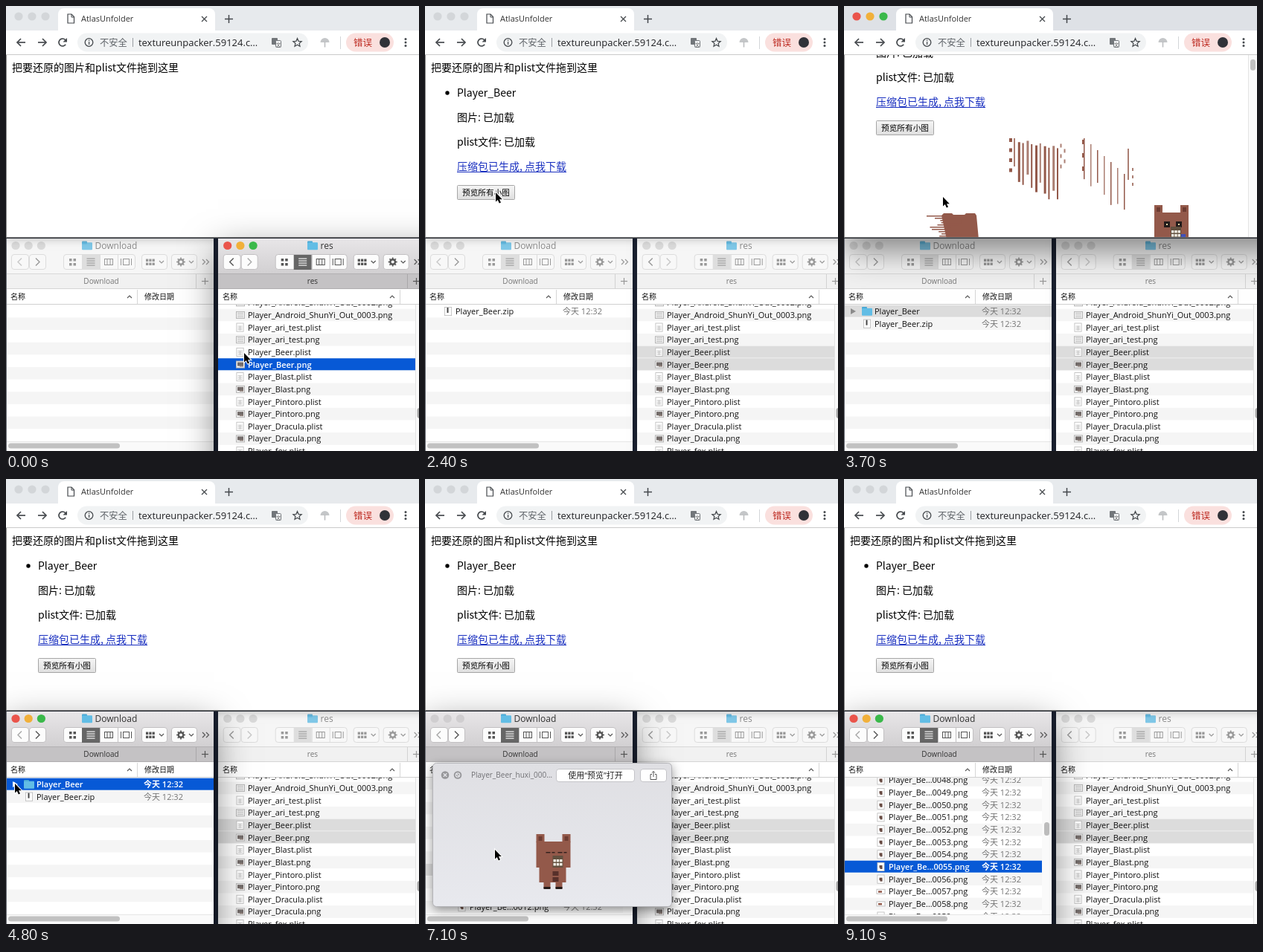
Write an HTML page with a canvas that moves like this. It is 555 px wide and 599 px high and loops after 9200 ms.

```html
<!DOCTYPE html>
<html lang="zh">
<head>
<meta charset="utf-8">
<style>
html, body { margin: 0; height: 100%; overflow: hidden; background: #1b2233; }
canvas { display: block; }
</style>
</head>
<body>
<canvas id="stage" width="555" height="599"></canvas>
<script>
const c = document.getElementById('stage').getContext('2d');
const LOOP = 9200, PITCH = 16.65;
const UI = '"Open Sans","Noto Sans CJK SC","Noto Sans CJK",sans-serif';
const WEB = '"Noto Sans CJK SC","Noto Sans CJK",sans-serif';
const BROWN = '#93594a', BLUE = '#0759d6';

// time, values...
const CURSOR = [[0, 320, 467], [200, 318, 466], [700, 186, 230], [900, 186, 230], [1200, 100, 215],
  [1500, 100, 215], [1800, 70, 410], [2100, 70, 410], [2400, 95, 251], [2700, 97, 252], [3000, 133, 257],
  [4000, 133, 257], [4300, 88, 251], [4500, 88, 251], [4800, 12, 410], [5000, 12, 410], [5300, 70, 438],
  [6700, 70, 438], [7600, 124, 575], [9200, 124, 575]];
const PAGE = [[2800, 0], [3700, 87], [4000, 140], [4300, 0]];
const SELECT = [[5000, 0], [5300, 4], [6200, 4], [6700, 7], [8000, 30], [9100, 60]];
const LIST = [[6700, 0], [8000, 383], [9100, 888]];

function at(keys, t) {
  let i = keys.findIndex(k => k[0] > t);
  if (i < 0) return keys[keys.length - 1].slice(1);
  if (i === 0) return keys[0].slice(1);
  const a = keys[i - 1], b = keys[i], p = (t - a[0]) / (b[0] - a[0]);
  return a.slice(1).map((v, j) => v + (b[j + 1] - v) * p);
}
const within = (t, a, b) => t >= a && t < b;

function rect(x, y, w, h, fill) { c.fillStyle = fill; c.fillRect(x, y, w, h); }
function round(x, y, w, h, r, fill, stroke) {
  c.beginPath(); c.roundRect(x, y, w, h, r);
  if (fill) { c.fillStyle = fill; c.fill(); }
  if (stroke) { c.strokeStyle = stroke; c.lineWidth = 1; c.stroke(); }
}
function disc(x, y, r, fill) { c.beginPath(); c.arc(x, y, r, 0, 7); c.fillStyle = fill; c.fill(); }
function ring(x, y, r, color, a = 0, b = 7, w = 1.3) {
  c.beginPath(); c.arc(x, y, r, a, b); c.strokeStyle = color; c.lineWidth = w; c.stroke();
}
function path(...p) { c.beginPath(); for (let i = 0; i < p.length; i += 2) c.lineTo(p[i], p[i + 1]); }
function line(color, w, ...p) { path(...p); c.strokeStyle = color; c.lineWidth = w; c.stroke(); }
function shape(fill, ...p) { path(...p); c.fillStyle = fill; c.fill(); }
function text(s, x, y, size, color = '#111', font = UI, align = 'left', weight = '') {
  c.font = `${weight} ${size}px ${font}`; c.textAlign = align; c.fillStyle = color; c.fillText(s, x, y);
}
function fade(y0, y1, a, b) {
  const g = c.createLinearGradient(0, y0, 0, y1);
  g.addColorStop(0, a); g.addColorStop(1, b);
  return g;
}
function clip(x, y, w, h, draw) {
  c.save(); c.beginPath(); c.rect(x, y, w, h); c.clip(); draw(); c.restore();
}
function shadowed(alpha, blur, dy, draw) {
  c.save();
  c.shadowColor = `rgba(0,0,0,${alpha})`; c.shadowBlur = blur; c.shadowOffsetY = dy;
  draw();
  c.restore();
}
function pane(x, y, w, h, on) {
  const fill = () => rect(x, y, w, h, '#fff');
  if (on) shadowed(.5, 46, 16, fill); else shadowed(.2, 10, 3, fill);
}
function lights(x, y, gap, on, off) {
  ['#ea544b', '#f1b03a', '#3ab94a'].forEach((col, i) => disc(x + gap * i, y, 5.6, on ? col : off));
}

function bear(x, y, shut) {
  const r = (a, b, w, h, f) => rect(x + a, y + b, w, h, f);
  for (const a of [0, 35]) { r(a, 0, 11, 11, BROWN); r(a + 3, 3, 5, 6, '#6d3c32'); }
  r(0, 10, 46, 35, BROWN);
  r(4, 45, 36, 20, BROWN);
  for (const a of [13, 29]) {
    if (shut) { r(a, 24, 6, 1.5, '#35221e'); r(a + 8, 24, 4, 1.5, '#35221e'); }
    else { r(a, 22, 8, 8, '#221b1a'); r(a + 3, 25, 2, 2, '#e8d9a8'); }
  }
  r(22, 29, 14, 16, '#62503f');
  for (let i = 0; i < 6; i++) r(23 + i % 3 * 4.3, 34 + (i > 2) * 5, 3.4, 3.5, '#f3efe6');
  if (!shut) r(36, 39, 6, 6, '#3f51b8');
  r(22, 50, 8, 6, '#57302a'); r(22, 58, 8, 6, '#57302a');
  for (const a of [10, 26]) { r(a, 65, 9, 8, BROWN); r(a, 71, 9, 3, '#241917'); }
}

function previews(y) {
  const pale = '#ab7f73';
  for (let i = 0; i < 11; i++) {
    const x = 228 + i * 5.8, n = Math.abs(Math.sin(i * 7.3));
    rect(x, y + i + n * 5, 2 + i % 2, 38 + i * 2 + n * 16, i % 3 ? BROWN : pale);
    if (i % 3 === 0) rect(222, y + i * 4.5, 4, 5, BROWN);
    if (i % 2) rect(288 + i % 4 * 2.5, y + 4 + i * 3.5, 2, 5, pale);
  }
  for (let i = 0; i < 7; i++) {
    const n = Math.abs(Math.sin(i * 4.1 + 1));
    rect(322 + i * 9, y + i * 8, 1.5, 40 + n * 18, i % 2 ? pale : BROWN);
  }
  rect(381, y + 14, 2, 42, pale);
  for (let i = 0; i < 3; i++) { rect(320, y + 2 + i * 18, 3, 6, BROWN); rect(387, y + 40 + i * 10, 2, 4, pale); }
  shape(BROWN, 131, y + 104, 134, y + 101, 145, y + 101, 147, y + 103, 162, y + 103, 164, y + 101,
    176, y + 101, 178, y + 104, 181, y + 136, 138, y + 136);
  for (let i = 0; i < 12; i++) {
    const n = Math.abs(Math.sin(i * 5.7));
    rect(111 + n * 20, y + 104 + i * 3, 28, 1.5, BROWN);
  }
  bear(417, y + 90);
  for (let i = 0; i < 8; i++) bear(122 + i % 4 * 98.3, y + 190 + (i >> 2) * 100, i % 3 === 1);
}

function webPage(t) {
  const scroll = within(t, 2800, 4400) ? at(PAGE, t)[0] : 0;
  const shown = within(t, 2600, 4400);
  const say = (s, x, y, col = '#000') => text(s, x, y - scroll, 14, col, WEB);
  clip(0, 66, 555, 246, () => {
    say('把要还原的图片和plist文件拖到这里', 8, 88);
    if (t >= 600) {
      disc(30, 117 - scroll, 2.7, '#000');
      say('Player_Beer', 43, 121.5);
      say('图片: 已加载', 43, 155);
      say('plist文件: 已加载', 43, 188);
      if (t < 1100) say('正在生成压缩包...', 43, 221);
      else {
        const s = '压缩包已生成, 点我下载';
        say(s, 43, 221, '#1a30c0');
        rect(43, 223 - scroll, c.measureText(s).width, 1, '#1a30c0');
        round(43.5, 241.5 - scroll, 77, 19, 1, fade(241 - scroll, 261 - scroll, '#f6f6f6', '#dedede'), '#a6a6a6');
        text('预览所有小图', 50, 255 - scroll, 10.67, '#000', WEB);
      }
    }
    if (shown) {
      previews(265 - scroll);
      rect(543, 66, 12, 246, '#fafafa');
      rect(543, 66, 1, 246, '#e4e4e4');
      round(546, 67.5 + scroll * .05, 7, 15, 3.5, '#c1c1c1');
    }
  });
}

function browser(t, on) {
  const ink = '#45494d';
  pane(0, 0, 640, 312, on);
  rect(0, 0, 555, 33, on ? '#dee1e6' : '#e7eaed');
  lights(17, 14, 18, on, '#d3d6d9');
  round(70, 3, 211, 32, [8, 8, 0, 0], '#fff');
  line(ink, 1.2, 83, 11, 88, 11, 91.5, 14.5, 91.5, 23, 83, 23, 83, 10.5);
  line(ink, 1, 88, 11, 88, 15, 91, 15);
  text('AtlasUnfolder', 101, 21, 11, '#333');
  line(ink, 1.3, 263, 14, 270, 21); line(ink, 1.3, 270, 14, 263, 21);
  line(ink, 1.5, 294, 17.5, 305, 17.5); line(ink, 1.5, 299.5, 12, 299.5, 23);

  line(ink, 1.7, 26, 49, 15, 49); line(ink, 1.7, 20, 44, 15, 49, 20, 54);
  line(ink, 1.7, 43, 49, 54, 49); line(ink, 1.7, 49, 44, 54, 49, 49, 54);
  ring(76, 49, 5, ink, .6, 5.6, 1.7);
  shape(ink, 82, 43, 82, 48.5, 76.5, 48.5);
  round(96, 36.5, 310, 25, 12.5, '#f1f3f4');
  ring(111.5, 49, 5.3, ink); rect(111, 48, 1.2, 4, ink); rect(111, 45.5, 1.2, 1.3, ink);
  text('不安全', 126, 53.5, 12.3, '#5f6368');
  rect(170, 43, 1, 12, '#9a9da1');
  text('textureunpacker.59124.c…', 178, 53.5, 13, '#202124');
  round(357, 43, 8, 9, 1, '#72767a'); round(362.5, 46.5, 7, 9, 1, '#f1f3f4', '#72767a');
  text('文', 363, 53.5, 6, '#555', WEB);
  c.beginPath();
  for (let i = 0; i < 10; i++) {
    const r = i % 2 ? 2.7 : 6, a = i * Math.PI / 5 - Math.PI / 2;
    c.lineTo(391.5 + r * Math.cos(a), 49.5 + r * Math.sin(a));
  }
  c.closePath(); c.strokeStyle = ink; c.lineWidth = 1.2; c.stroke();
  c.beginPath(); c.arc(428.5, 49, 6, Math.PI, 0); c.fillStyle = '#c4c6c8'; c.fill();
  line('#b9bbbd', 1.5, 428.5, 48, 428.5, 55.5);
  rect(449, 41, 1, 17, '#d3d5d8');
  round(457, 36.5, 64, 25, 12.5, '#fae0de');
  text('错误', 467, 53.5, 12.5, '#bd2a21');
  disc(509, 49, 7, '#303238');
  for (const y of [44.5, 49, 53.5]) disc(537, y, 1.5, ink);
  rect(0, 65, 555, 1, '#c9c9c9');
  webPage(t);
  rect(0, 66, 1, 246, '#8d8d8d');
  rect(0, 311, 555, 1, '#777');
}

function folder(x, y) {
  round(x, y, 7, 4, 1, '#44a6d4');
  round(x, y + 1.7, 14, 10, 1, '#62bde5');
}
function sheet(x, y) {
  rect(x - 4.5, y - 6, 10, 12, '#b9b9b9');
  rect(x - 3.7, y - 5.2, 8.4, 10.4, '#fff');
}
function plistIcon(x, y) {
  sheet(x, y);
  for (let i = 0; i < 3; i++) rect(x - 2.5, y - 2 + i * 2.3, 6, 1, '#c4c4c4');
  rect(x, y - 2, 1, 6, '#c4c4c4');
}
function pngIcon(x, y, dark) {
  rect(x - 6, y - 5, 12, 10, '#b5b5b5');
  rect(x - 5, y - 4, 10, 8, '#f2f2f2');
  if (dark) { rect(x - 4, y - 3, 8, 5, '#726b69'); rect(x - 1, y + 1, 5, 2, '#8a7c76'); }
  else for (let i = 0; i < 3; i++) rect(x - 4, y - 3 + i * 2.4, 8, 1, '#bdbdbd');
}

// Finder chrome; dx shifts the shared toolbar
function finder(x, w, dx, name, titleX, tabX, plusX, dividerX, on, lit) {
  const ink = on ? '#555' : '#999', edge = on ? '#c2c0c2' : '#dcdcdc';
  pane(x, 313, dx ? w + 100 : w, 340, on);
  rect(x, 313, w, 48, on ? fade(313, 361, '#e8e6e8', '#d1cfd1') : '#f6f6f6');
  lights(13 + dx, 322.5, 17.2, lit, on ? '#d0ced0' : '#dadada');
  c.globalAlpha = on ? 1 : .8; folder(titleX, 316.5); c.globalAlpha = 1;
  text(name, titleX + 17.5, 327, 12, on ? '#333' : '#8c8c8c');
  const box = (a, b) => round(a + dx + .5, 334.5, b - a - 1, 20, 3.5, on ? '#fcfcfc' : '#f8f8f8', edge);
  box(7, 31); box(31, 54); box(77, 174); box(182, 217); box(222, 257);
  const L = (w, ...p) => line(ink, w, ...p.map((v, i) => i % 2 ? v : v + dx));
  const back = () => L(1.4, 21, 339.5, 16, 344.5, 21, 349.5);
  const next = () => L(1.4, 40, 339.5, 45, 344.5, 40, 349.5);
  c.globalAlpha = .5; (dx ? next : back)();
  c.globalAlpha = 1; (dx ? back : next)();
  rect(102 + dx, 335, 24, 20, on ? '#666' : '#dedede');
  for (const a of [126, 150]) rect(a + dx, 335, 1, 20, edge);
  for (const [a, b] of [[85, 340], [90.5, 340], [85, 346], [90.5, 346]]) rect(a + dx, b, 3.5, 3.5, ink);
  for (let i = 0; i < 4; i++) rect(108.5 + dx, 339.5 + i * 3, 11, 1.1, on ? '#fff' : '#999');
  c.strokeStyle = ink; c.lineWidth = 1;
  c.strokeRect(132.5 + dx, 340.5, 11, 8); c.strokeRect(157.5 + dx, 340.5, 8, 8);
  for (const a of [136, 140, 154.5, 168.5]) L(1, a, 340, a, 349);
  for (let i = 0; i < 6; i++) rect(188 + dx + i % 3 * 4.3, 340.5 + (i > 2) * 5, 3.2, 3.5, ink);
  L(1.2, 206, 343, 209, 346, 212, 343); L(1.2, 246, 343, 249, 346, 252, 343);
  ring(235 + dx, 344.5, 3.3, ink, 0, 7, 2.4);
  for (let i = 0; i < 8; i++) {
    const a = i * Math.PI / 4, u = Math.cos(a), v = Math.sin(a);
    L(1.7, 235 + 4 * u, 344.5 + 4 * v, 235 + 6 * u, 344.5 + 6 * v);
  }
  for (const a of [264, 269]) L(1.2, a, 341, a + 3.5, 344.5, a, 348);

  rect(x, 361, w, 20, on ? '#c4c2c4' : '#f1f1f1');
  rect(x, 360, w, 1, on ? '#b2b0b2' : '#d9d9d9');
  rect(x, 380, w, 1, on ? '#b0aeb0' : '#d4d4d4');
  rect(plusX - 12, 361, 1, 19, on ? '#a9a7a9' : '#d2d2d2');
  text(name, tabX, 374, 10, on ? '#333' : '#777', UI, 'center');
  line(ink, 1.2, plusX - 4, 370.5, plusX + 5, 370.5); line(ink, 1.2, plusX + .5, 366, plusX + .5, 375);
  text('名称', x + 6, 395, 10);
  line('#555', 1.1, dividerX - 13, 393, dividerX - 10, 390, dividerX - 7, 393);
  rect(dividerX, 382, 1, 19, '#d6d6d6');
  rect(x, 401, w, 1, '#d0d0d0');
}

const pad = n => String(n).padStart(4, '0');
const childNo = i => i < 5 ? i - 1 : i - 5;

function downloads(t, on, quick) {
  finder(0, 279, 0, 'Download', 102, 128, 267, 176, on, on && !quick);
  text('修改日期', 186, 395, 10);
  const open = t >= 5000, scroll = at(LIST, t)[0], right = open ? 266 : 279;
  const sel = open ? Math.round(at(SELECT, t)[0]) : t >= 2600 || within(t, 1800, 2200) ? 0 : -1;
  const count = open ? 80 : t < 1500 ? 0 : t < 2600 ? 1 : 2;
  clip(0, 402, 279, 184, () => {
    const first = Math.floor(scroll / PITCH) - 1;
    for (let i = Math.max(0, first); i < first + 14; i++) {
      const y = 411 + i * PITCH - scroll, picked = i === sel, hot = picked && on && !quick;
      if (i % 2) rect(0, y - 8.3, right, PITCH, '#f5f5f5');
      if (picked) rect(0, y - 8.3, right, 16, hot ? BLUE : '#dcdcdc');
      if (i >= count) continue;
      const isDir = i === 0 && t >= 2600, child = open && i > 0;
      const label = (s, x, col = '#111') => text(s, x, y + 4, 11, hot ? '#fff' : col, UI, 'left', hot ? '600' : '');
      if (isDir) {
        const fill = hot ? '#fff' : '#8b8b8b';
        if (open) shape(fill, 8, y - 3, 16, y - 3, 12, y + 4);
        else shape(fill, 9, y - 4, 16, y, 9, y + 4);
        folder(24, y - 6);
        label('Player_Beer', 41);
      } else if (child) {
        const n = childNo(i);
        if ([18, 57, 58].includes(n)) {
          rect(43.5, y - 3.5, 12, 7, '#c0c0c0'); rect(44.5, y - 2.5, 10, 5, '#fff'); rect(46, y - 1, 5, 2.5, BROWN);
        } else { sheet(49, y); rect(47.5, y - 2, 4, 3.5, '#674a42'); rect(48.5, y + 1, 3, 2, '#674a42'); }
        label(`Player_Be…${pad(n)}.png`, 60);
      } else {
        sheet(30.5, y); rect(29.5, y - 5, 2, 7, '#444');
        label('Player_Beer.zip', 41);
      }
      label('今天 12:32', 185, '#747474');
    }
    if (open) {
      rect(266, 402, 13, 184, '#fafafa');
      round(269, 403 + scroll * .0665, 7, 18, 3.5, '#bcbcbc');
    }
  });
  rect(0, 586, 279, 13, '#fafafa'); rect(0, 586, 279, 1, '#e6e6e6');
  round(3, 588.5, open ? 136 : 150, 7, 3.5, '#c1c1c1');
}

const FILES = ['Android_ShunYi_Out_0002.png', 'Android_ShunYi_Out_0003.png', 'ari_test.plist', 'ari_test.png',
  'Beer.plist', 'Beer.png', 'Blast.plist', 'Blast.png', 'Pintoro.plist', 'Pintoro.png', 'Dracula.plist',
  'Dracula.png', 'fox.plist'];

function resources(t, on) {
  finder(285, 270, 284.7, 'res', 405, 412, 551, 529, on, on);
  clip(285, 402, 270, 197, () => {
    FILES.forEach((f, j) => {
      const y = 399.3 + j * PITCH, picked = j === 5 || j === 4 && t >= 200;
      if (j % 2) rect(285, y - 8.3, 265, PITCH, '#f5f5f5');
      if (picked) rect(285, y - 8.3, 265, 16, on ? BLUE : '#dcdcdc');
      if (f.endsWith('plist')) plistIcon(314, y); else pngIcon(315, y, j > 4);
      const hot = picked && on;
      text('Player_' + f, 325, y + 4, 11, hot ? '#fff' : '#111', UI, 'left', hot ? '600' : '');
    });
    rect(550, 402, 5, 197, '#fafafa'); rect(550, 402, 1, 197, '#e2e2e2');
    round(552.5, 541, 7, 14, 3.5, '#a8a8a8');
  });
}

function quickLook(t) {
  shadowed(.45, 14, 4, () => round(10.5, 382.5, 321, 193, 5, fade(382, 576, '#dfdfe3', '#e8e9ee')));
  round(10.5, 382.5, 321, 193, 5, null, '#b4b4b8');
  disc(27, 398.5, 5.3, '#97979a'); disc(44, 398.5, 5.3, '#97979a');
  line('#e4e4e8', 1.3, 24.7, 396.2, 29.3, 400.8); line('#e4e4e8', 1.3, 29.3, 396.2, 24.7, 400.8);
  ring(44, 398.5, 2.7, '#e4e4e8'); line('#e4e4e8', 1.2, 42, 396.5, 46, 400.5);
  const n = childNo(Math.max(1, Math.round(at(SELECT, t)[0])));
  text(`Player_Beer_huxi_${pad(n).slice(0, 3)}…`, 62, 402, 10, '#707074');
  round(176.5, 390.5, 105, 17, 3.5, '#fff', '#c4c4c8');
  text('使用“预览”打开', 229, 403, 11, '#222', '"Open Sans",' + WEB, 'center');
  round(289.5, 390.5, 35, 17, 3.5, '#fff', '#c4c4c8');
  line('#555', 1, 305, 397.5, 303, 397.5, 303, 404.5, 311, 404.5, 311, 397.5, 309, 397.5);
  line('#555', 1, 307, 401, 307, 393.5); line('#555', 1, 305, 395.5, 307, 393.5, 309, 395.5);
  bear(149.5, 478, true);
}

function pointer(x, y) {
  c.beginPath();
  for (const [a, b] of [[0, 0], [0, 12.5], [2.8, 10], [4.8, 14.5], [7, 13.5], [5, 9.2], [8.8, 9.2]]) c.lineTo(x + a, y + b);
  c.closePath();
  c.strokeStyle = '#fff'; c.lineWidth = 2; c.stroke();
  c.fillStyle = '#000'; c.fill();
}

function draw(t) {
  const web = within(t, 600, 1700) || within(t, 2500, 4700);
  const left = within(t, 1700, 2200) || t >= 4700;
  const right = t < 1100;
  const quick = within(t, 5300, 7500);
  rect(0, 0, 555, 599, '#1b2233');
  // active windows come last, so their shadow falls on the others
  const panes = [
    [left, () => downloads(t, left, quick)],
    [right, () => resources(t, right)],
    [web ? 2 : 0, () => browser(t, web)]
  ];
  panes.sort((a, b) => a[0] - b[0]).forEach(p => p[1]());
  rect(0, 312, 555, 1, '#2b3038');
  rect(0, 313, 1, 286, '#6b6e76');
  if (quick) quickLook(t);
  if (t < 8500) pointer(...at(CURSOR, t));
}

const start = performance.now();
(function tick() {
  const t = (performance.now() - start) % LOOP;
  draw(Math.floor(t / 100) * 100);
  requestAnimationFrame(tick);
})();
</script>
</body>
</html>
```
